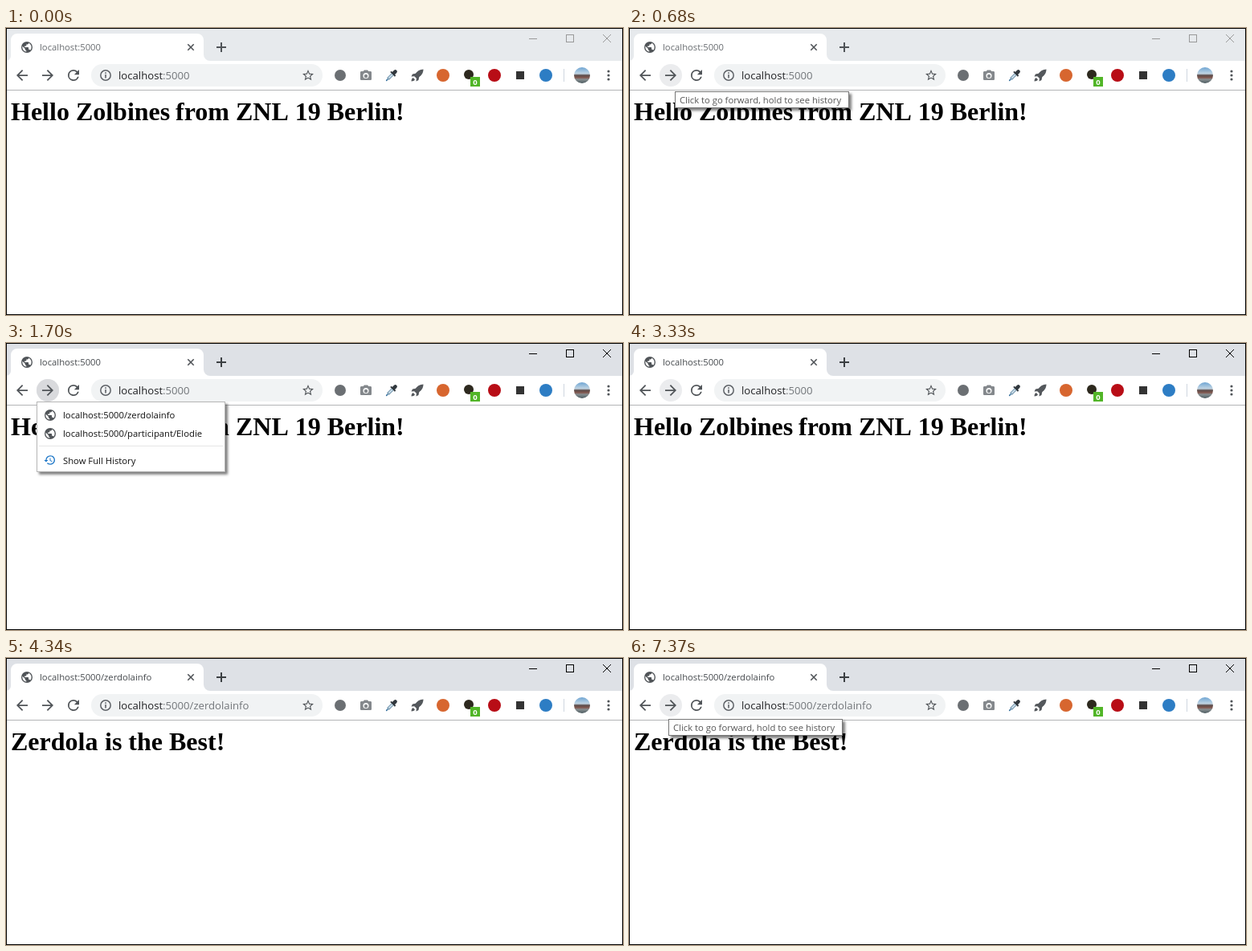
Recreate the animation shown at these times as an HTML page with a canvas. Size 768 by 358 pixels, loop 8 s.

```html
<!DOCTYPE html>
<html lang="en">
<head>
<meta charset="utf-8">
<title>Browser history</title>
<style>
html, body { margin: 0; width: 100%; height: 100%; overflow: hidden; background: #fff; }
canvas { display: block; width: 768px; height: 358px; }
</style>
</head>
<body>
<canvas id="stage"></canvas>
<script>
const W = 768, H = 358, LOOP = 8000;
const canvas = document.getElementById('stage');
const ctx = canvas.getContext('2d');
const dpr = window.devicePixelRatio || 1;
canvas.width = W * dpr;
canvas.height = H * dpr;

const UI = '"Open Sans", "Noto Sans", sans-serif';
const SERIF = '"Liberation Serif", "Noto Serif", serif';
const SMALL = '11.27px ' + UI;
const GREY = '#5f6368';
const HOST = 'localhost';
const PATH = '/zerdolainfo';

// Icons on a 24 unit grid
const ICON = {
  back: 'M20 11H7.83l5.59-5.59L12 4l-8 8 8 8 1.41-1.41L7.83 13H20z',
  forward: 'M4 11H16.17L10.58 5.41L12 4l8 8-8 8-1.41-1.41L16.17 13H4z',
  reload: 'M17.65 6.35A7.95 7.95 0 0 0 12 4a8 8 0 1 0 7.73 10h-2.08A6 6 0 1 1 12 6c1.66 0 3.14.69 4.22 1.78L13 11h7V4z',
  star: 'M22 9.24l-7.19-.62L12 2 9.19 8.63 2 9.24l5.46 4.73L5.82 21 12 17.27 18.18 21l-1.63-7.03zM12 15.4l-3.76 2.27 1-4.28-3.32-2.88 4.38-.38L12 6.1l1.71 4.04 4.38.38-3.32 2.88 1 4.28z',
  globe: 'M12 2a10 10 0 1 0 0 20 10 10 0 1 0 0-20zm-1 17.93c-3.95-.49-7-3.85-7-7.93 0-.62.08-1.21.21-1.79L9 15v1c0 1.1.9 2 2 2zm6.9-2.54c-.26-.81-1-1.39-1.9-1.39h-1v-3c0-.55-.45-1-1-1H8v-2h2c.55 0 1-.45 1-1V7h2c1.1 0 2-.9 2-2v-.41c2.93 1.19 5 4.06 5 7.41 0 2.08-.8 3.97-2.1 5.39z',
  history: 'M13 3a9 9 0 0 0-9 9H1l3.89 3.89.07.14L9 12H6a7 7 0 1 1 2.06 4.94l-1.42 1.42A9 9 0 1 0 13 3zm-1 5v5l4.28 2.54.72-1.21-3.5-2.08V8z',
  camera: 'M9 2L7.17 4H4c-1.1 0-2 .9-2 2v12c0 1.1.9 2 2 2h16c1.1 0 2-.9 2-2V6c0-1.1-.9-2-2-2h-3.17L15 2zM12 7a5 5 0 1 0 0 10 5 5 0 1 0 0-10z',
  rocket: 'M22 2C16 2 12 5 9 9L4 10 2 14l5-.5 3.500 3.500L10 22l4-2 1-5c4-3 7-7 7-13zM5 16c-2 1-3 3-3 6 3 0 5-1 6-3z'
};
for (const k in ICON) ICON[k] = new Path2D(ICON[k]);

function icon(name, x, y, scale, color) {
  ctx.save();
  ctx.translate(x - 12 * scale, y - 12 * scale);
  ctx.scale(scale, scale);
  ctx.fillStyle = color;
  ctx.fill(ICON[name], 'evenodd');
  ctx.restore();
}
function rect(x, y, w, h, color) {
  ctx.fillStyle = color;
  ctx.fillRect(x, y, w, h);
}
function disc(x, y, r, color) {
  ctx.fillStyle = color;
  ctx.beginPath();
  ctx.arc(x, y, r, 0, Math.PI * 2);
  ctx.fill();
}
function ring(x, y, r, color, width, from = 0, to = Math.PI * 2) {
  ctx.strokeStyle = color;
  ctx.lineWidth = width;
  ctx.beginPath();
  ctx.arc(x, y, r, from, to);
  ctx.stroke();
}
function line(x1, y1, x2, y2, color, width) {
  ctx.strokeStyle = color;
  ctx.lineWidth = width;
  ctx.beginPath();
  ctx.moveTo(x1, y1);
  ctx.lineTo(x2, y2);
  ctx.stroke();
}
function cross(x, y, r, color, width) {
  line(x - r, y - r, x + r, y + r, color, width);
  line(x - r, y + r, x + r, y - r, color, width);
}
function text(str, x, y, font, color) {
  ctx.font = font;
  ctx.fillStyle = color;
  ctx.fillText(str, x, y);
  return x + ctx.measureText(str).width;
}
function panel(x, y, w, h, border) {
  ctx.save();
  ctx.shadowColor = 'rgba(0,0,0,.5)';
  ctx.shadowBlur = 3 * dpr;
  ctx.shadowOffsetX = ctx.shadowOffsetY = 3 * dpr;
  rect(x, y, w, h, border);
  ctx.restore();
  rect(x + 1, y + 1, w - 2, h - 2, '#fff');
}

function drawTab(s) {
  rect(0, 0, W, 41, s.active ? '#dee1e6' : '#e7eaed');
  ctx.fillStyle = '#fff';
  ctx.beginPath();
  ctx.moveTo(0, 41);
  ctx.arcTo(6, 41, 6, 33, 6);
  ctx.arcTo(6, 7, 14, 7, 8);
  ctx.arcTo(246, 7, 246, 15, 8);
  ctx.arcTo(246, 41, 254, 41, 8);
  ctx.lineTo(254, 41);
  ctx.fill();

  if (s.loading) ring(26, 24, 6, '#8a8e93', 2, Math.PI, Math.PI * 2.2);
  else icon('globe', 26, 24, .7, '#505458');
  text(HOST + ':5000' + (s.done ? PATH : ''), 42, 28, SMALL, s.active ? '#45494d' : '#686c70');
  cross(230, 24, 3.7, '#505458', 1.6);
  const plus = s.active ? '#3c4043' : '#505458';
  rect(262, 23, 12, 2, plus);
  rect(267, 18, 2, 12, plus);

  const ctl = s.active ? '#000' : '#999';
  rect(651, 13, 10, 1, ctl);
  ctx.strokeStyle = ctl;
  ctx.lineWidth = 1;
  ctx.strokeRect(697.5, 8.5, 9, 9);
  cross(748, 13, 5, ctl, 1);
}

function drawDropper() {
  ctx.save();
  ctx.translate(480, 59);
  ctx.rotate(Math.PI / 4);
  ctx.lineCap = 'round';
  line(0, -6.500, 0, -4, '#30373d', 4.5);
  rect(-4, -3.5, 8, 2, '#30373d');
  rect(-2, -1.5, 4, 8, '#7f9fb5');
  rect(-.8, -1, 1.6, 6, '#d5e6f0');
  line(0, 7, 0, 9, '#356f9d', 1.5);
  ctx.restore();
}

function drawAvatar() {
  ctx.save();
  ctx.beginPath();
  ctx.arc(717, 59, 10, 0, Math.PI * 2);
  ctx.clip();
  const g = ctx.createLinearGradient(0, 49, 0, 69);
  g.addColorStop(0, '#6fa5d3');
  g.addColorStop(.4, '#c3d6e4');
  g.addColorStop(.5, '#5a4a48');
  g.addColorStop(.65, '#83584f');
  g.addColorStop(.75, '#878f91');
  g.addColorStop(1, '#4c5b60');
  rect(707, 49, 20, 20, g);
  ctx.restore();
}

function drawToolbar(s) {
  rect(0, 41, W, 36, '#fff');
  rect(0, 77, W, 1, '#b4b5b7');
  icon('back', 20, 59, .875, '#505458');
  if (s.hover) disc(52, 59, 14, '#ebecee');
  if (s.press) disc(52, 59, s.press, '#d9dadd');
  icon('forward', 52, 59, .875, '#505458');
  if (s.loading) cross(84, 59, 5.5, '#505458', 2);
  else icon('reload', 84, 59, .875, '#505458');

  ctx.fillStyle = '#f1f3f4';
  ctx.beginPath();
  ctx.roundRect(106, 45, 288, 28, 14);
  ctx.fill();
  ring(124, 59, 6.2, GREY, 1.5);
  rect(123.2, 58, 1.6, 4.5, GREY);
  rect(123.2, 55.3, 1.6, 1.6, GREY);
  const font = '13.15px ' + UI;
  const end = text(HOST, 140, 64, font, '#202124');
  text(':5000' + (s.done ? PATH : ''), end, 64, font, '#72767a');
  icon('star', 376, 59, .7, '#505458');

  disc(416, 59, 7, '#6b6f73');
  icon('camera', 448, 59.5, .7, '#84888c');
  disc(448, 60, 2.2, '#84888c');
  drawDropper();
  icon('rocket', 512, 59, .75, '#54585c');
  disc(544, 59, 8, '#d7662f');
  disc(576, 58, 6, '#2d291e');
  rect(578, 61, 12, 12, '#51b527');
  text('0', 581.2, 70.5, 'bold 9.500px ' + UI, '#fff');
  disc(608, 59, 8, '#b80d16');
  rect(635, 54, 10, 10, '#333');
  disc(672, 59, 8, '#2d7dc4');
  rect(694, 51, 1, 16, '#cfd6df');
  drawAvatar();
  for (const y of [54, 59, 64]) disc(750, y, 1.6, '#505458');
}

function drawPage(s) {
  rect(0, 78, W, H - 78, '#fff');
  const font = 'bold 32px ' + SERIF;
  const words = s.done
    ? [['Zerdola', 6], ['is the Best!', 123]]
    : [['Hello Zolbines', 6], ['from ZNL 19 Berlin!', 211]];
  for (const [str, x] of words) text(str, x, 115, font, '#000');
}

function drawTip(x, y) {
  panel(x, y, 217, 21, '#767676');
  text('Click to go forward, hold to see history', x + 6, y + 14.5, SMALL, '#575757');
}

function drawMenu() {
  panel(38, 73, 235, 88, '#b5b5b5');
  icon('globe', 55, 90, .7, '#505458');
  icon('globe', 55, 113, .7, '#505458');
  icon('history', 54.5, 146, .65, '#1f78c8');
  text(HOST + ':5000' + PATH, 71, 94, SMALL, '#111');
  text(HOST + ':5000/participant/Elodie', 71, 117, SMALL, '#111');
  rect(41, 128, 229, 1, '#e6e6e6');
  text('Show Full History', 71, 151, SMALL, '#111');
}

function stateAt(t) {
  const within = (a, b) => t >= a && t < b;
  return {
    active: t >= 1100,
    hover: within(500, 4340) || t >= 7170,
    press: within(1100, 1300) ? 9 : within(1300, 3330) ? 14 : 0,
    menu: within(1700, 3330),
    done: t >= 3530,
    loading: within(3530, 3730),
    tip: within(680, 1100) ? [57, 79] : t >= 7370 ? [49, 76] : null
  };
}

function draw(now) {
  const s = stateAt(now % LOOP);
  ctx.setTransform(dpr, 0, 0, dpr, 0, 0);
  drawTab(s);
  drawToolbar(s);
  drawPage(s);
  if (s.menu) drawMenu();
  if (s.tip) drawTip(...s.tip);
  ctx.strokeStyle = '#000';
  ctx.lineWidth = 1;
  ctx.strokeRect(.5, .5, W - 1, H - 1);
}

const start = performance.now();
function tick() {
  draw(performance.now() - start);
  requestAnimationFrame(tick);
}
tick();
</script>
</body>
</html>
```
